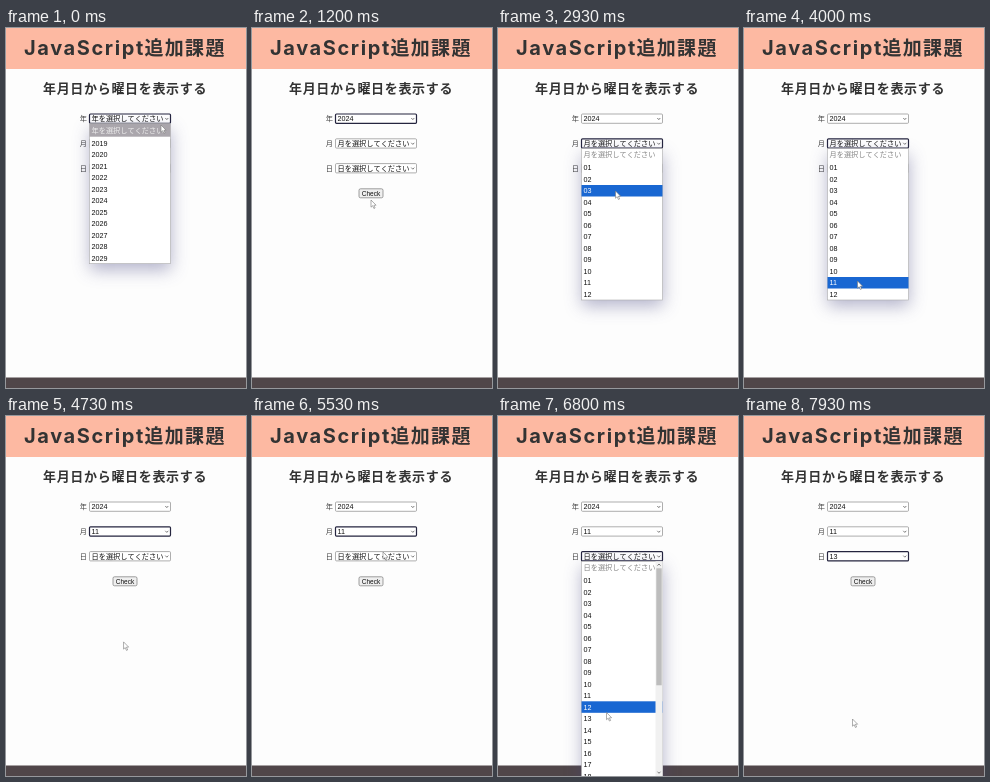
Write an HTML page with a canvas that moves like this. It is 240 by 360 pixels and loops after 8 s.

```html
<!DOCTYPE html>
<html lang="ja">
<head>
<meta charset="utf-8">
<title>年月日から曜日を表示する</title>
<style>
html, body { margin: 0; width: 100%; height: 100%; overflow: hidden; background: #fdfdfd; }
canvas { display: block; width: 240px; height: 360px; }
</style>
</head>
<body>
<canvas id="stage"></canvas>
<script>
const canvas = document.getElementById('stage');
const ctx = canvas.getContext('2d');
const scale = window.devicePixelRatio || 1;
canvas.width = 240 * scale;
canvas.height = 360 * scale;
ctx.scale(scale, scale);

const LOOP = 8000;
const LEFT = 83.5, WIDTH = 81, HEADER_ROW = 13.5, ROW = 11.5;
const UI_FONT = '7.2px "Liberation Sans", "Noto Sans CJK JP", "Noto Sans CJK", sans-serif';
const CJK_FONT = '"Noto Sans CJK JP", "Noto Sans CJK", sans-serif';

const numbers = (from, to) =>
  Array.from({ length: to - from + 1 }, (_, i) => String(from + i).padStart(2, '0'));

const fields = [
  { label: '年', y: 86, options: numbers(2019, 2029), value: '2024', open: 0, close: 850 },
  { label: '月', y: 110.8, options: numbers(1, 12), value: '11', open: 2150, close: 4350 },
  { label: '日', y: 135.6, options: numbers(1, 31), value: '13', open: 5750, close: 7500 }
];

// Pointer stops: time, x, y
const stops = [
  [0, 155, 97], [200, 155, 97], [750, 119, 172], [1400, 119, 172],
  [2000, 132, 114], [2250, 132, 114], [2850, 117.5, 163], [3100, 117.5, 163],
  [3900, 113.5, 253], [4450, 113.5, 253], [5350, 131, 136], [5850, 131, 136],
  [6750, 108.5, 296.5], [6850, 108.5, 296.5], [7100, 108.5, 303], [LOOP, 108.5, 303]
];

function pointerAt(time) {
  const next = stops.findIndex(stop => stop[0] > time);
  const [t0, x0, y0] = stops[next - 1];
  const [t1, x1, y1] = stops[next];
  const p = (time - t0) / (t1 - t0);
  const eased = p * p * (3 - 2 * p);
  return { x: x0 + (x1 - x0) * eased, y: y0 + (y1 - y0) * eased };
}

function rect(x, y, w, h, color) {
  ctx.fillStyle = color;
  ctx.fillRect(x, y, w, h);
}

function box(x, y, w, h, radius, fill, stroke, lineWidth) {
  ctx.beginPath();
  ctx.roundRect(x, y, w, h, radius);
  ctx.fillStyle = fill;
  ctx.fill();
  ctx.strokeStyle = stroke;
  ctx.lineWidth = lineWidth;
  ctx.stroke();
}

function text(string, x, y, color, font = UI_FONT, spacing = 0, align = 'left') {
  ctx.font = font;
  ctx.letterSpacing = spacing + 'px';
  ctx.textAlign = align;
  ctx.fillStyle = color;
  ctx.fillText(string, x, y);
}

function chevron(x, y, direction = 1) {
  ctx.beginPath();
  ctx.moveTo(x - 1.5, y - 0.8 * direction);
  ctx.lineTo(x, y + 0.8 * direction);
  ctx.lineTo(x + 1.5, y - 0.8 * direction);
  ctx.strokeStyle = '#444';
  ctx.lineWidth = 0.7;
  ctx.stroke();
}

const placeholder = field => field.label + 'を選択してください';

function drawPage() {
  rect(0, 0, 240, 360, '#fdfdfd');
  rect(0, 0, 240, 41, '#fdb9a2');
  rect(0, 349.5, 240, 10.5, '#504649');
  text('JavaScript', 18, 27, '#333', 'bold 20px Inter, sans-serif', 1.6);
  text('追加課題', 138.5, 27, '#333', 'bold 19px ' + CJK_FONT, 1.3);
  text('年月日から曜日を表示する', 37, 65.2, '#333', 'bold 13px ' + CJK_FONT, 0.68);
  box(107, 160.8, 24, 9, 1.5, '#efefef', '#777', 0.7);
  text('Check', 119, 167.7, '#111', '6.5px "Liberation Sans", sans-serif', 0, 'center');
}

function drawField(field, time, focused) {
  const chosen = time >= field.close;
  text(field.label, 73.7, field.y + 7.4, '#444');
  box(LEFT, field.y, WIDTH, 9.3, 1, '#fff', focused ? '#25253f' : '#8b8b8b', focused ? 1.2 : 0.7);
  text(chosen ? field.value : placeholder(field), 85.5, field.y + 7.3, '#111');
  chevron(160.8, field.y + 4.8);
}

function drawMenu(field, pointer) {
  const top = field.y + 9.7;
  const listTop = top + HEADER_ROW;
  const height = HEADER_ROW + field.options.length * ROW;
  const scrolls = top + height > 360;
  const hovered = Math.floor((pointer.y - listTop) / ROW);
  const atHeader = field === fields[0] && hovered < 0;

  ctx.save();
  ctx.shadowColor = 'rgba(70, 70, 130, 0.4)';
  ctx.shadowBlur = 16 * scale;
  ctx.shadowOffsetY = 6 * scale;
  rect(LEFT, top, WIDTH, height, '#fff');
  ctx.restore();
  ctx.strokeStyle = '#aaa';
  ctx.lineWidth = 0.6;
  ctx.strokeRect(LEFT, top, WIDTH, height);

  if (atHeader) rect(LEFT, top, WIDTH, HEADER_ROW - 0.5, '#aaa6ac');
  text(placeholder(field), 85.5, top + 8.9, atHeader ? '#eee' : '#858585');
  field.options.forEach((option, i) => {
    const y = listTop + i * ROW;
    if (i === hovered) rect(LEFT, y, WIDTH, ROW, '#1967d2');
    text(option, 85.5, y + 8.4, i === hovered ? '#fff' : '#111');
  });

  if (scrolls) {
    rect(157.5, top, 7, 360 - top, '#f1f1f1');
    rect(158.3, top + 7, 5.4, 117, '#bdbdbd');
    chevron(161, top + 3.5, -1);
    chevron(161, 356.5);
  }
}

function drawPointer({ x, y }) {
  ctx.save();
  ctx.translate(x, y);
  ctx.beginPath();
  [[0, 0], [0, 7.2], [1.7, 5.7], [2.9, 8.5], [4.1, 8], [2.9, 5.3], [5.1, 5.2]]
    .forEach(point => ctx.lineTo(...point));
  ctx.closePath();
  ctx.fillStyle = '#fff';
  ctx.fill();
  ctx.strokeStyle = '#777';
  ctx.lineWidth = 0.6;
  ctx.stroke();
  ctx.restore();
}

function draw(now) {
  const time = now % LOOP;
  const pointer = pointerAt(time);
  const focused = fields.findLast(field => time >= field.open);
  drawPage();
  fields.forEach(field => drawField(field, time, field === focused));
  if (time < focused.close) drawMenu(focused, pointer);
  drawPointer(pointer);
}

const start = performance.now();
function tick() {
  draw(performance.now() - start);
  requestAnimationFrame(tick);
}
tick();
</script>
</body>
</html>
```
